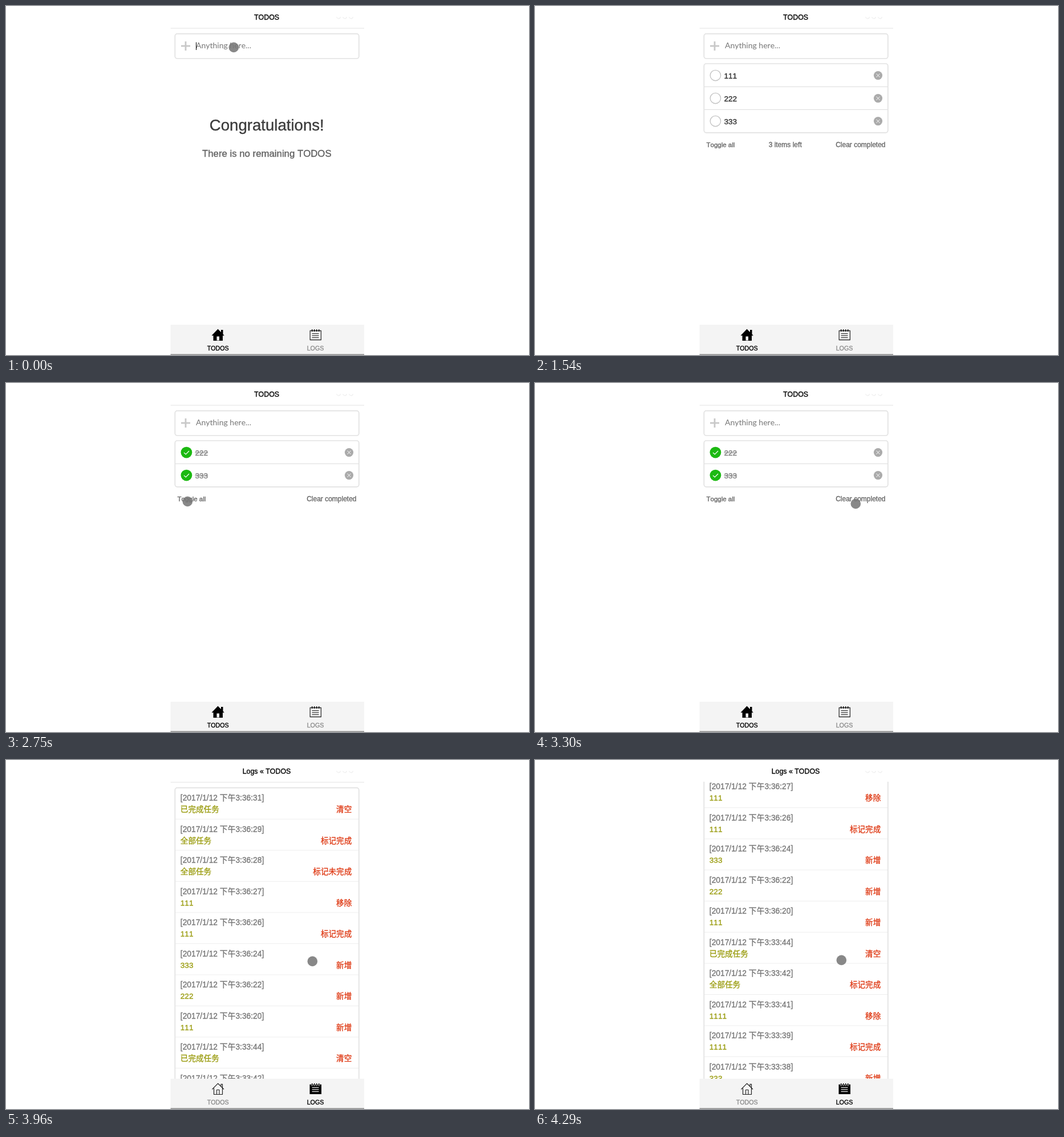
Recreate the animation shown at these times as an HTML page with a canvas. Size 917 px wide and 611 px high, loop 4400 ms.

```html
<!DOCTYPE html>
<html lang="en">
<head>
<meta charset="utf-8">
<title>TODOS</title>
<style>
html, body { margin: 0; width: 100%; height: 100%; overflow: hidden; background: #fff; }
canvas { display: block; width: 917px; height: 611px; }
</style>
</head>
<body>
<canvas id="stage" width="917" height="611"></canvas>
<script>
const ctx = document.getElementById('stage').getContext('2d');
const STEP = 110, LOOP = 4400;
const SANS = '"Liberation Sans", "Noto Sans CJK SC", "Noto Sans CJK", Arial, sans-serif';
const EDGE = '#e2e2e2';

// pointer path: step, x, y
const PATH = [
  [15, 385, 100], [17, 316, 124], [19, 600, 124], [20, 400, 197], [21, 330, 207],
  [23, 318, 207], [26, 318, 207], [28, 440, 215], [30, 562, 211], [31, 562, 211],
  [33, 542, 581], [34, 542, 581], [36, 537, 352], [39, 537, 350]
];

const DONE = '标记完成', ADD = '新增', DROP = '移除', CLEAR = '清空';
const ALL = '全部任务', FINISHED = '已完成任务';
const LOGS = [
  ['36:31', FINISHED, CLEAR], ['36:29', ALL, DONE], ['36:28', ALL, '标记未完成'],
  ['36:27', '111', DROP], ['36:26', '111', DONE], ['36:24', '333', ADD],
  ['36:22', '222', ADD], ['36:20', '111', ADD], ['33:44', FINISHED, CLEAR],
  ['33:42', ALL, DONE], ['33:41', '1111', DROP], ['33:39', '1111', DONE],
  ['33:38', '333', ADD], ['33:36', '222', ADD]
];

// a hairline outline gives the text its slightly heavier weight
function text(s, x, y, size, color, align = 'left', font = SANS, weight = 0.35) {
  ctx.font = size + 'px ' + font;
  ctx.fillStyle = ctx.strokeStyle = color;
  ctx.textAlign = align;
  ctx.lineWidth = weight;
  ctx.fillText(s, x, y);
  if (weight) ctx.strokeText(s, x, y);
}

function line(color, width, ...pts) {
  ctx.strokeStyle = color;
  ctx.lineWidth = width;
  ctx.beginPath();
  for (let i = 0; i < pts.length; i += 2) ctx.lineTo(pts[i], pts[i + 1]);
  ctx.stroke();
}

function box(y, h) {
  ctx.strokeStyle = EDGE;
  ctx.lineWidth = 1.7;
  ctx.beginPath();
  ctx.roundRect(296.3, y, 322.5, h, 4);
  ctx.stroke();
}

function disc(x, y, r, color) {
  ctx.fillStyle = color;
  ctx.beginPath();
  ctx.arc(x, y, r, 0, Math.PI * 2);
  ctx.fill();
}

function header(title, ruled) {
  ctx.fillStyle = '#fff';
  ctx.fillRect(288, 0, 340, 38);
  text(title, 457, 24, 12.4, '#000', 'center');
  if (ruled) line('#e4e4e4', 1.2, 288.5, 39, 628, 39);
  ctx.strokeStyle = '#efefef';
  ctx.lineWidth = 1.2;
  for (let i = 0; i < 3; i++) {
    ctx.beginPath();
    ctx.arc(583 + i * 11, 18.5, 3.5, 0.2, Math.PI - 0.2);
    ctx.stroke();
  }
}

function house(on) {
  ctx.fillStyle = '#000';
  if (on) {
    ctx.beginPath();
    for (const [x, y] of [[360.5, 577], [371.5, 565.5], [377, 571], [377, 567], [380.5, 567],
      [380.5, 574.5], [382.8, 577], [380, 577], [380, 586], [363.5, 586], [363.5, 577]]) ctx.lineTo(x, y);
    ctx.fill();
    ctx.fillStyle = '#f4f4f4';
    ctx.fillRect(369.5, 578.5, 4.5, 7);
  } else {
    line('#222', 1.2, 361.5, 576.5, 371.5, 566.3, 382, 576.5);
    line('#222', 1.2, 364.5, 574.5, 364.5, 585.5, 379.5, 585.5, 379.5, 567.5, 377, 567.5, 377, 571);
    line('#222', 1.1, 369.5, 585, 369.5, 577.5, 374, 577.5, 374, 585);
  }
}

function notepad(on) {
  const ink = on ? '#f4f4f4' : '#333';
  if (on) {
    ctx.fillStyle = '#000';
    ctx.fillRect(532.5, 568, 20.5, 17);
  } else {
    ctx.strokeStyle = '#333';
    ctx.lineWidth = 1.3;
    ctx.strokeRect(533.2, 568.5, 19.2, 16);
  }
  for (let i = 0; i < 4; i++) {
    const x = 536.7 + i * 4;
    if (on) line('#f4f4f4', 2.6, x, 567, x, 570.5);
    line('#111', 1.5, x, 566, x, 570);
  }
  for (const y of [573.5, 577, 580.5]) line(ink, 1.2, 536.5, y, 548.5, y);
}

function tabs(logs) {
  ctx.fillStyle = '#f4f4f4';
  ctx.fillRect(288.5, 558, 339.5, 53);
  line('#777', 1.2, 288.5, 610.2, 628, 610.2);
  house(!logs);
  notepad(logs);
  text('TODOS', 371.7, 602.5, 10.7, logs ? '#8c8c8c' : '#000', 'center');
  text('LOGS', 542.5, 602.5, 10.7, logs ? '#000' : '#8c8c8c', 'center');
}

// three keystrokes per entry, then enter
function typed(k) {
  for (const [start, digit] of [[1, '1'], [6, '2'], [11, '3']])
    if (k >= start && k < start + 3) return digit.repeat(k - start + 1);
  return '';
}

function items(k) {
  if (k >= 31) return [];
  const list = [];
  if (k >= 4 && k < 19) list.push(['111', k >= 17]);
  if (k >= 9) list.push(['222', k >= 25]);
  if (k >= 14) list.push(['333', k >= 25]);
  return list;
}

function entry(k) {
  box(48.7, 43.3);
  line('#c8c8c8', 2.8, 307, 70, 323, 70);
  line('#c8c8c8', 2.8, 315, 62, 315, 78);
  const s = typed(k);
  if (s) text(s, 332.7, 74.3, 13.6, '#111');
  else text('Anything here...', 333, 74, 14, '#777', 'left', 'Lato, sans-serif', 0);
  if (k < 14) {
    const x = 333.5 + s.length * 7.2;
    line('#000', 1, x, 63.5, x, 77);
  }
}

function row(name, done, y) {
  if (done) {
    disc(316.4, y, 9.9, '#1cb912');
    line('#fff', 1.2, 312, y + 0.3, 315.2, y + 3.2, 321, y - 2.6);
  } else {
    ctx.strokeStyle = '#c4c4c4';
    ctx.lineWidth = 1.4;
    ctx.beginPath();
    ctx.arc(316.4, y, 9.2, 0, Math.PI * 2);
    ctx.stroke();
  }
  text(name, 331.4, y + 5, 13.6, done ? '#808080' : '#333');
  if (done) line('#808080', 1.1, 331.4, y + 0.5, 354.2, y + 0.5);
  disc(601.5, y, 7.6, '#ababab');
  line('#fff', 1, 598.5, y - 3, 604.5, y + 3);
  line('#fff', 1, 604.5, y - 3, 598.5, y + 3);
}

function todos(k) {
  entry(k);
  const list = items(k), n = list.length;
  if (!n) {
    text('Congratulations!', 457.3, 218, 27.6, '#3c3c3c', 'center');
    text('There is no remaining TODOS', 457.3, 263.5, 16.8, '#606060', 'center');
    return;
  }
  box(101, 40 * n + 0.8);
  list.forEach(([name, done], i) => {
    if (i) line(EDGE, 1.3, 297, 101.4 + 40 * i, 618, 101.4 + 40 * i);
    row(name, done, 121.6 + 40 * i);
  });
  const y = 126.5 + 40 * n, left = list.filter(item => !item[1]).length;
  text('Toggle all', 300.5, y, 11.5, '#666');
  if (left) text(left + (left > 1 ? ' items' : ' item') + ' left', 438.7, y, 12, '#666', 'center');
  text('Clear completed', 614.5, y, 12, '#666', 'right');
}

function logs(scroll) {
  ctx.save();
  ctx.beginPath();
  ctx.rect(288, 38, 340, 520);
  ctx.clip();
  ctx.translate(0, -scroll);
  box(48.7, LOGS.length * 54.5);
  LOGS.forEach(([time, name, action], i) => {
    const y = 49 + 54.5 * i;
    if (i) line('#eee', 1, 297, y, 618, y);
    text('[2017/1/12 下午3:' + time + ']', 305.8, y + 22.3, 13.8, '#777');
    text(name, 305.8, y + 42.3, 13.6, '#9b9d12');
    text(action, 606.3, y + 42.3, 13.6, '#df3d18', 'right');
  });
  ctx.restore();
}

function pointer(k) {
  if (k === 0) return [399, 72];
  const i = PATH.findIndex(p => p[0] >= k);
  if (i < 0 || k < PATH[0][0]) return null;
  if (PATH[i][0] === k) return PATH[i].slice(1);
  const [a, x, y] = PATH[i - 1], [b, u, v] = PATH[i], f = (k - a) / (b - a);
  return [x + (u - x) * f, y + (v - y) * f];
}

function draw(k) {
  ctx.fillStyle = '#fff';
  ctx.fillRect(0, 0, 917, 611);
  ctx.fontKerning = 'none';
  ctx.lineJoin = 'round';
  const inLogs = k >= 34;
  const f = Math.max(0, (k - 36) / 3), scroll = 183.5 * f * f * (3 - 2 * f);
  if (inLogs) logs(scroll);
  else todos(k);
  header(inLogs ? 'Logs « TODOS' : 'TODOS', scroll === 0);
  tabs(inLogs);
  const p = pointer(k);
  if (p) disc(p[0] + 0.3, p[1] + 0.4, 8.8, 'rgba(118,118,118,0.87)');
}

const begin = performance.now();
function tick() {
  draw(Math.floor(((performance.now() - begin) % LOOP) / STEP));
  requestAnimationFrame(tick);
}
tick();
</script>
</body>
</html>
```
